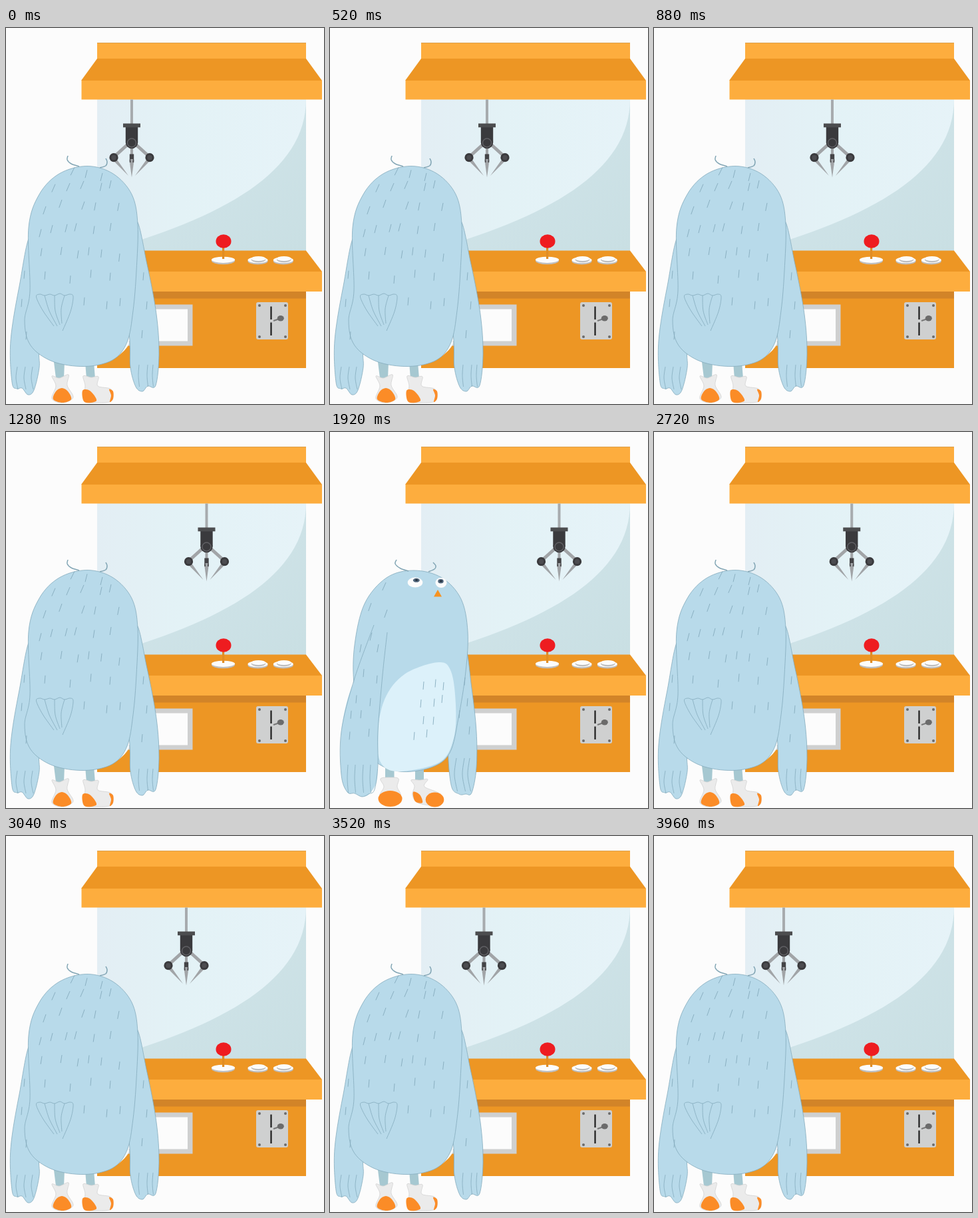
An HTML page with a canvas for the animation above (4 s loop, 478 px wide and 565 px high).

```html
<!DOCTYPE html>
<html lang="en">
<head>
<meta charset="utf-8">
<title>Claw machine</title>
<style>
html, body { margin: 0; width: 100%; height: 100%; overflow: hidden; background: #fcfcfc; }
canvas { display: block; width: 100vw; height: 100vh; }
</style>
</head>
<body>
<canvas id="stage" width="478" height="565"></canvas>
<script>
const ctx = document.getElementById('stage').getContext('2d');
const LOOP = 4000, STEP = 40, TURN_ON = 1800, TURN_OFF = 2120;

const PAPER = '#fcfcfc', ORANGE = '#ed9624', LIGHT = '#fdad3e', TOE = '#fb8c27';
const BLUE = '#b8daea', LINE = '#85abbd', LEG = '#a6c8d1', SOCK = '#ebebeb';
const STEEL = '#a1a4a7', IRON = '#3a3a3d', GREY = '#cfd0d0';

// Claw position keys: [ms, x]
const KEYS = [[0, 189], [520, 236], [1280, 301.5], [1920, 344.5], [1985, 346.5],
  [2050, 344.5], [2360, 325.5], [3040, 271], [3960, 195], [4000, 191.5]];

function slope(i) {
  const a = KEYS[Math.max(0, i - 1)], b = KEYS[Math.min(KEYS.length - 1, i + 1)];
  return (b[1] - a[1]) / (b[0] - a[0]);
}

function clawX(t) {
  const i = KEYS.findLastIndex(([time]) => time <= t);
  const [t0, x0] = KEYS[i], [t1, x1] = KEYS[i + 1];
  const d = t1 - t0, u = (t - t0) / d, v = 1 - u;
  return x0 * v * v * (1 + 2 * u) + x1 * u * u * (3 - 2 * u)
    + d * u * v * (slope(i) * v - slope(i + 1) * u);
}

function paint(fill, stroke, width = 0.8) {
  if (fill) { ctx.fillStyle = fill; ctx.fill(); }
  if (stroke) { ctx.strokeStyle = stroke; ctx.lineWidth = width; ctx.stroke(); }
}

function rect(x, y, w, h, fill) {
  ctx.fillStyle = fill;
  ctx.fillRect(x, y, w, h);
}

function oval(x, y, rx, ry, fill, stroke, width) {
  ctx.beginPath();
  ctx.ellipse(x, y, rx, ry, 0, 0, Math.PI * 2);
  paint(fill, stroke, width);
}

function poly(p, fill) {
  ctx.beginPath();
  for (let i = 0; i < p.length; i += 2) ctx.lineTo(p[i], p[i + 1]);
  paint(fill);
}

// Smooth outline through the points
function curve(p, closed) {
  const n = p.length / 2;
  const at = i => {
    const k = closed ? (i + n) % n : Math.min(n - 1, Math.max(0, i));
    return [p[2 * k], p[2 * k + 1]];
  };
  ctx.beginPath();
  ctx.moveTo(...at(0));
  for (let i = 0; i < (closed ? n : n - 1); i++) {
    const [a, b, c, d] = [at(i - 1), at(i), at(i + 1), at(i + 2)];
    ctx.bezierCurveTo(b[0] + (c[0] - a[0]) / 6, b[1] + (c[1] - a[1]) / 6,
      c[0] - (d[0] - b[0]) / 6, c[1] - (d[1] - b[1]) / 6, c[0], c[1]);
  }
}

function blob(p, fill, stroke) { curve(p, true); paint(fill, stroke); }
function thread(p, color = LINE, width = 0.8) { curve(p); paint(null, color, width); }

// Rows of feather marks: [y, ...xs]; they lean away from the axis near the head
function hairs(rows, axis) {
  ctx.beginPath();
  for (const [y, ...xs] of rows) {
    const tilt = Math.max(0, (360 - y) / 30);
    for (const x of xs) {
      const top = y + 5 * Math.sin(x * 1.7);
      ctx.moveTo(x, top);
      ctx.lineTo(x - 1 - tilt * (x < axis ? 1 : 0.4), top + 12);
    }
  }
  paint(null, LINE, 0.9);
}

function fingers(xs, top, bottom, bow) {
  for (const x of xs) thread([x, top, x - bow, (top + bottom) / 2, x + bow / 2, bottom]);
}

function drawGlass() {
  const dark = ctx.createLinearGradient(280, 140, 451, 335);
  dark.addColorStop(0, '#d0e4e9');
  dark.addColorStop(1, '#c9dfe3');
  rect(137, 107, 314, 228, dark);
  const light = ctx.createLinearGradient(137, 0, 451, 0);
  light.addColorStop(0, '#e3eef4');
  light.addColorStop(0.4, '#e3f2f6');
  light.addColorStop(1, '#e6f3f8');
  ctx.beginPath();
  ctx.moveTo(137, 107);
  ctx.lineTo(451, 107);
  ctx.bezierCurveTo(451, 215, 330, 285, 137, 338);
  paint(light);
}

function drawButton(x) {
  oval(x, 350.5, 15, 5, '#bdbdbd');
  oval(x, 348.7, 15, 4.6, PAPER);
  oval(x + 1, 348, 11, 4.2, '#bdbdbd');
  oval(x + 1, 346.5, 11, 3.6, PAPER);
}

function drawCabinet() {
  rect(137, 22, 314, 24, LIGHT);
  rect(137, 22, 314, 1, '#dca04c');
  poly([137, 46, 451, 46, 475, 79, 113, 79], ORANGE);
  rect(113.5, 79, 361.5, 28.5, LIGHT);

  poly([137, 334.5, 451, 334.5, 475, 366, 113, 366], ORANGE);
  rect(113.5, 366, 361.5, 30, LIGHT);
  rect(137, 396, 314, 115, ORANGE);
  rect(137, 396, 314, 10.5, '#d28428');
  rect(165, 415.5, 115.5, 62, GREY);
  rect(172, 422.5, 101, 48, PAPER);

  oval(326.5, 350, 17.5, 5.2, '#bfbfbf');
  oval(326.5, 348.3, 17.5, 4.6, PAPER);
  rect(325, 329, 3.2, 18, '#e08d25');
  oval(327, 320.5, 11.5, 10.3, '#ee1c20');
  drawButton(378.5);
  drawButton(416.8);

  ctx.beginPath();
  ctx.roundRect(376, 412, 48, 56, 3);
  paint(GREY);
  for (const x of [381, 420]) for (const y of [417, 464]) oval(x, y, 2, 2, '#6b6b6b');
  for (const y of [418.5, 442.5]) rect(397.4, y, 2.2, 19.5, '#1d1d1d');
  thread([402, 440, 411, 437], '#777', 2);
  oval(412.8, 436.2, 5, 4.2, '#6b6b6b');
}

function drawClaw(x) {
  ctx.save();
  ctx.translate(x, 0);
  rect(-2, 107.5, 4, 37, '#a7abae');
  for (const side of [-1, 1]) {
    ctx.save();
    ctx.scale(side, 1);
    thread([5, 174, 26, 193], STEEL, 5);
    poly([22, 198, 27, 200, 5, 222], STEEL);
    oval(27, 194.7, 6.6, 6.6, IRON);
    oval(27, 194.7, 3.6, 3.6, '#4c4c50');
    ctx.restore();
  }
  poly([-3.6, 198, 3.6, 198, 0, 224.5], STEEL);
  rect(-2, 180, 4, 10, STEEL);
  rect(-3.2, 189.5, 6.4, 12.5, '#444447');
  poly([-2, 197, 2, 197, 0, 214], STEEL);
  rect(-9.2, 149, 18.4, 23, IRON);
  oval(0, 172, 9.2, 9.2, IRON);
  rect(-13, 143.5, 26, 5.8, '#4c4d4f');
  oval(0, 172.5, 6.5, 6.5, IRON, '#606064', 1.4);
  ctx.restore();
}

function drawBack() {
  poly([72, 502, 88, 502, 87, 526, 75, 526], LEG);
  poly([119, 502, 132, 502, 134, 527, 121, 527], LEG);
  blob([69, 523, 80, 526, 94, 521, 92, 537, 101, 555, 85, 563, 69, 557, 75, 538], SOCK, '#d2d2d2');
  blob([71, 558, 75, 546, 84, 541, 93, 546, 98, 558, 85, 563], TOE);
  blob([116, 523, 128, 525, 139, 524, 138, 538, 158, 543, 159, 560, 138, 563, 117, 560, 119, 538], SOCK, '#d2d2d2');
  blob([115, 545, 126, 545, 136, 560, 118, 562], TOE);
  blob([155, 543, 161, 546, 161, 557, 156, 562, 158, 552], TOE);

  // Pale rim against the cabinet
  blob([130, 504, 165, 495, 185, 473, 165, 465], '#f5fafc');

  // Wings
  blob([195, 290, 212, 355, 226, 430, 230, 490, 225, 537, 213, 538, 205, 546, 195, 539, 187, 510, 186, 470, 180, 380], BLUE, LINE);
  blob([38, 312, 20, 388, 7, 470, 9, 532, 16, 542, 24, 541, 33, 551, 42, 544, 50, 510, 50, 480, 60, 400], BLUE, LINE);
  fingers([17, 29, 40], 509, 543, 2);
  fingers([200, 213, 221], 506, 539, 1);

  // Body
  blob([122, 207.5, 161, 219, 189, 250, 198, 295, 196, 365, 191, 425, 182, 472, 160, 499,
    118, 508.5, 70, 501, 37, 477, 28, 440, 36, 395, 34, 300, 50, 250, 80, 219], BLUE, LINE);
  thread([110, 208, 98, 204, 92, 198, 93, 192], '#83a6b5', 1.5);
  thread([141, 210, 150, 207, 152, 201, 150, 196], '#83a6b5', 1.5);

  // Tail
  thread([72, 448, 55, 424, 45.5, 404, 51, 400, 58, 402, 66, 400, 73, 402, 81, 399, 88, 402, 96, 400, 101, 404, 97, 426, 85, 455]);
  thread([58, 402, 65, 425, 77, 448]);
  thread([73, 402, 74, 425, 81, 446]);
  thread([88, 402, 83, 422, 84, 444]);
  hairs([
    [213, 103, 122, 145], [234, 74, 96, 117, 144, 158], [263, 60, 84, 118, 135, 170],
    [298, 53, 70, 92, 106, 133, 158], [334, 54, 84, 109, 125, 144, 171],
    [367, 28, 59, 97, 128, 157, 207], [407, 24, 118, 152, 172, 212], [453, 31, 205]
  ], 122);
}

function drawFront() {
  rect(83, 502, 13.5, 24, LEG);
  rect(128, 502, 13, 25, LEG);
  blob([76, 521, 91, 519, 103, 521, 101, 533, 105, 547, 76, 547, 81, 533], SOCK, '#d2d2d2');
  oval(90.5, 551, 18, 12, TOE);
  blob([122, 523, 135, 523, 147, 522, 142, 533, 165, 544, 163, 560, 134, 558, 124, 546, 127, 532], SOCK, '#d2d2d2');
  blob([125, 541, 135, 545, 139, 557, 128, 555], TOE);
  oval(157.5, 552.5, 13.8, 11, TOE);

  // Right wing
  blob([203, 322, 213, 385, 220, 450, 220, 505, 213, 542, 204, 544, 194, 544, 182, 530, 178, 465, 190, 380], BLUE, LINE);
  fingers([190, 202, 210], 490, 540, 3);

  // Body and belly
  blob([126, 208, 168, 219, 197, 251, 207, 300, 204, 360, 193, 430, 180, 482, 152, 504,
    104, 510, 65, 492, 47, 450, 36, 380, 37, 320, 52, 258, 85, 219], BLUE, LINE);
  blob([163, 346, 182, 360, 189, 410, 186, 460, 165, 496, 105, 510, 77, 498, 71, 458, 82, 402, 112, 364], '#dcf1fa');

  // Left wing
  blob([85, 305, 60, 340, 32, 385, 17, 450, 17, 515, 26, 541, 37, 543, 48, 548, 59, 544, 70, 525, 72, 490, 74, 400], BLUE);
  thread([86, 301, 79, 365, 72, 450, 72, 500, 67, 537, 58, 544, 48, 548, 37, 543, 26, 541, 17, 515, 17, 450, 36, 373, 66, 290]);
  fingers([27, 38, 50, 61], 500, 542, 1);

  // Face
  thread([118, 209, 106, 205, 98, 198, 100, 192], '#83a6b5', 1.5);
  thread([148, 210, 157, 206, 159, 201, 155, 196], '#83a6b5', 1.5);
  oval(128, 226, 11.3, 7.5, PAPER);
  oval(167, 226.5, 8.5, 7.5, PAPER);
  oval(129.8, 222.8, 5, 3, '#52677c');
  oval(166.5, 224.3, 4.2, 3.3, '#52677c');
  for (const [x, y] of [[130, 222.6], [166.8, 224.1]]) oval(x, y, 2, 1.5, '#26323f');
  poly([162, 237, 168, 247.5, 156, 247.5], '#f79321');
  hairs([
    [231, 84], [262, 62, 86], [300, 63], [324, 47, 73], [361, 51, 71],
    [371, 141, 159, 171, 203], [400, 40, 61, 137, 157, 169, 207],
    [423, 32, 47, 141, 156, 195], [447, 30, 59, 127, 146, 210]
  ], 122);
}

function draw(t) {
  rect(0, 0, 478, 565, PAPER);
  drawGlass();
  drawCabinet();
  drawClaw(clawX(t));
  if (t >= TURN_ON && t < TURN_OFF) drawFront();
  else drawBack();
}

const start = performance.now();
function tick() {
  const t = (performance.now() - start) % LOOP;
  draw(Math.floor(t / STEP) * STEP);
  requestAnimationFrame(tick);
}
tick();
</script>
</body>
</html>
```
